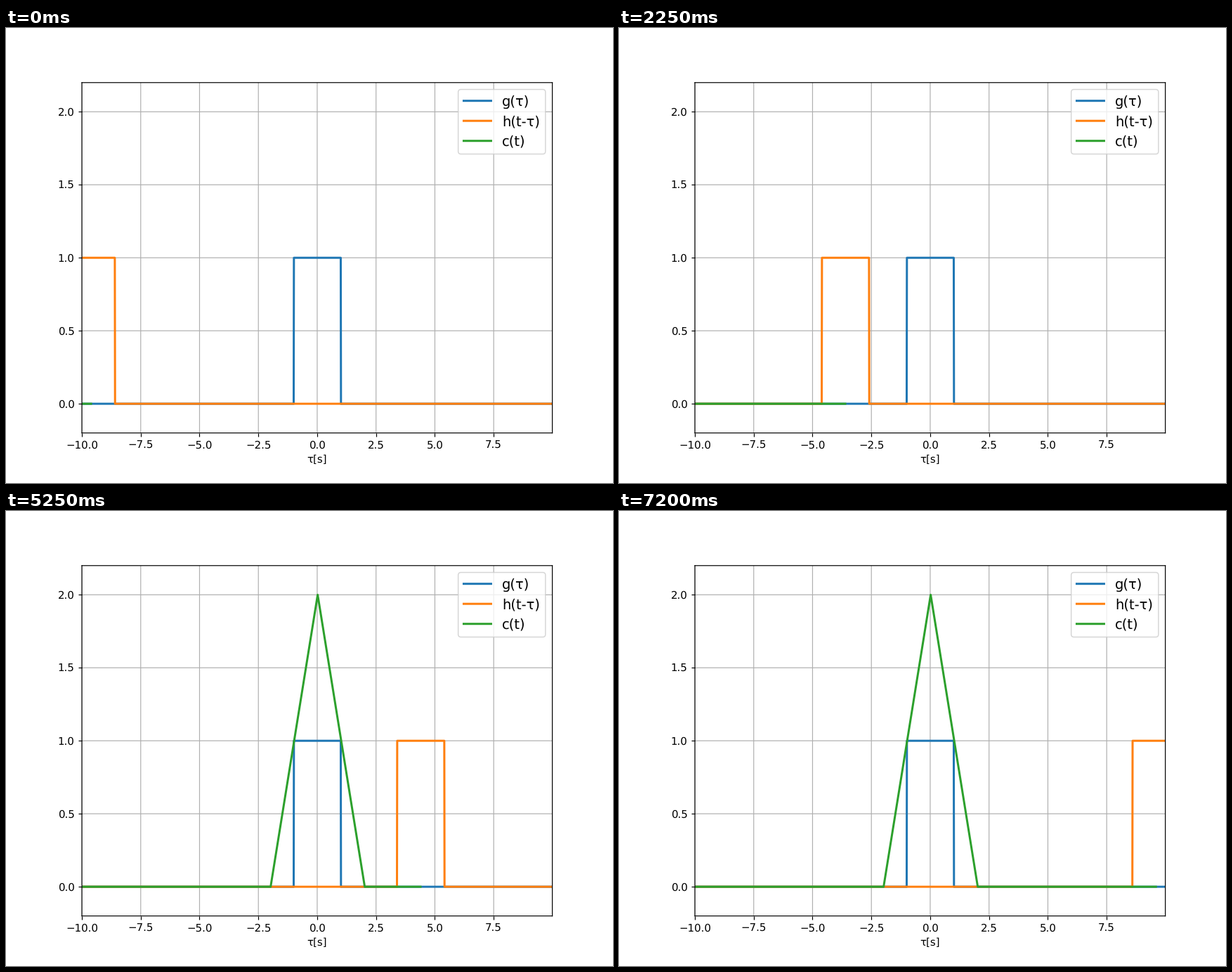
A matplotlib script for the animation above (7350 ms loop, 864 by 648 pixels).

```python
import numpy as np
import matplotlib.pyplot as plt
from matplotlib.animation import FuncAnimation

FRAMES = 49
INTERVAL = 150  # ms
DX = 0.01
STEP = 40  # samples advanced per frame

# Smooth, unsnapped lines and unhinted text
plt.rcParams.update({"path.snap": False, "text.hinting": "none"})

x = np.arange(-10, 10, DX)


def rect(v):
    """Unit pulse on [-1, 1]."""
    return np.where(np.abs(v) <= 1, 1.0, 0.0)


g = rect(x)
c = np.convolve(g, g, mode="same") * DX

fig, ax = plt.subplots(figsize=(8, 6), dpi=108)
ax.set_xlim(x[0], x[-1])
ax.set_ylim(-0.2, 2.2)
ax.set_xlabel("τ[s]")
ax.grid(True)

ax.plot(x, g, lw=2, label="g(τ)")
h_line, = ax.plot([], [], lw=2, label="h(t-τ)")
c_line, = ax.plot([], [], lw=2, label="c(t)")
legend = ax.legend(loc="upper right", fontsize=13, labelspacing=0.47)
legend.get_frame().set_snap(False)


def update(k):
    i = STEP * (k + 1)
    h_line.set_data(x, rect(x[i] - x))
    c_line.set_data(x[:i], c[:i])
    return h_line, c_line


anim = FuncAnimation(fig, update, frames=FRAMES, interval=INTERVAL,
                     repeat=True, repeat_delay=0, blit=False)
plt.show()
```
